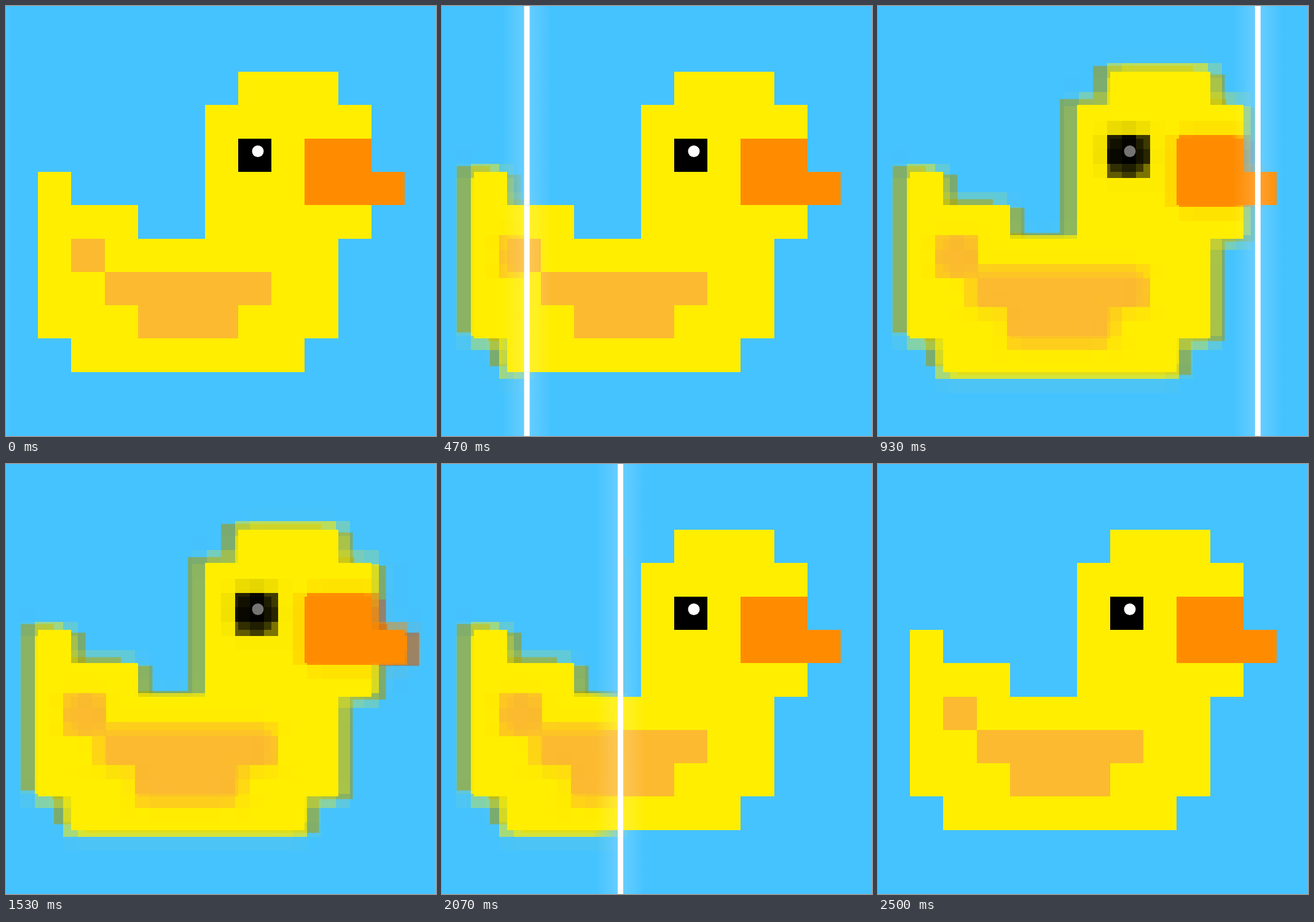
An HTML page with a canvas for the animation above (2630 ms loop, 700 px wide and 700 px high).

```html
<!DOCTYPE html>
<html lang="en">
<head>
<meta charset="utf-8">
<title>Duck sweep</title>
<style>
html, body { margin: 0; width: 100%; height: 100%; overflow: hidden; background: #45c3ff; }
canvas { display: block; width: 100vw; height: 100vh; }
</style>
</head>
<body>
<canvas id="stage" width="700" height="700"></canvas>
<script>
const SIZE = 700, LOOP = 2630, CELLS = 30;
const SKY = '#45c3ff';

// Y body, E eye, B beak, W wing
const DUCK = [
  '      YYY  ',
  '     YYYYY ',
  '     YEYBB ',
  'Y    YYYBBB',
  'YYY  YYYYY ',
  'YWYYYYYYY  ',
  'YYWWWWWYY  ',
  'YYYWWWYYY  ',
  ' YYYYYYY   '
];
const PITCH = 54.3, LEFT = 52, TOP = 107;

const BODY = { Y: '#ffee00', E: '#ffee00', W: '#ffee00', B: '#ff8c00' };
const FULL = { ...BODY, E: '#000', W: '#fcba30' };
const DETAILS = { E: '#000', W: '#fcba30' };
const FEATURES = { ...DETAILS, B: '#ff8c00' };
const GHOST = { Y: '#a39600', E: '#a39600', W: '#a39600', B: '#c64d00' };

const ctx = document.getElementById('stage').getContext('2d');

function layer(size = SIZE) {
  const c = document.createElement('canvas');
  c.width = c.height = size;
  return c.getContext('2d');
}

function duck(colors) {
  const g = layer();
  const edge = (start, i) => Math.round(start + i * PITCH);
  DUCK.forEach((row, j) => [...row].forEach((key, i) => {
    if (!colors[key]) return;
    const x = edge(LEFT, i), y = edge(TOP, j);
    g.fillStyle = colors[key];
    g.fillRect(x, y, edge(LEFT, i + 1) - x, edge(TOP, j + 1) - y);
  }));
  return g.canvas;
}

// Averages a picture over a coarse grid of cells.
function pixelate(picture) {
  const small = layer(CELLS), big = layer();
  small.imageSmoothingQuality = 'high';
  small.filter = 'blur(0.5px)';
  small.drawImage(picture, 0, 0, CELLS, CELLS);
  big.imageSmoothingEnabled = false;
  big.drawImage(small.canvas, 0, 0, SIZE, SIZE);
  return big.canvas;
}

function put(g, picture, alpha = 1, x = 0, y = 0) {
  g.globalAlpha = alpha;
  g.drawImage(picture, x, y);
  g.globalAlpha = 1;
}

function putSoft(g, picture, alpha) {
  g.filter = 'blur(0.7px)';
  put(g, picture, alpha);
  g.filter = 'none';
}

function glint(g, alpha) {
  g.fillStyle = `rgba(255,255,255,${alpha})`;
  g.beginPath();
  g.arc(410, 236.5, 9.5, 0, Math.PI * 2);
  g.fill();
}

function sky() {
  const g = layer();
  g.fillStyle = SKY;
  g.fillRect(0, 0, SIZE, SIZE);
  return g;
}

function cleanScene() {
  const g = sky();
  putSoft(g, duck(FULL));
  glint(g, 1);
  return g.canvas;
}

function mosaicScene() {
  const figure = layer();
  putSoft(figure, duck(BODY));
  figure.globalCompositeOperation = 'source-atop';
  putSoft(figure, duck(DETAILS), 0.5);
  const blocks = pixelate(duck(FEATURES));
  put(figure, blocks);
  put(figure, blocks);
  glint(figure, 0.45);

  const g = sky(), ghost = duck(GHOST);
  put(g, ghost, 0.55, -28, -9.5);
  put(g, ghost, 0.55, 23.5, 4.5);
  put(g, pixelate(duck(BODY)));
  put(g, figure.canvas);
  return g.canvas;
}

const clean = cleanScene(), mosaic = mosaicScene(), masked = layer();

// start, end in ms; from, to in px
const SWEEPS = [
  { start: 136, end: 1216, from: -31, to: 745 },
  { start: 1445, end: 2595, from: 745, to: -55 }
];

function barAt(t) {
  const s = SWEEPS[t < 1330 ? 0 : 1];
  const p = Math.min(1, Math.max(0, (t - s.start) / (s.end - s.start)));
  return s.from + (s.to - s.from) * (1 - Math.cos(Math.PI * p)) / 2;
}

// Thirty steps a second, on a 10 ms clock.
function stepTime(t) {
  const at = k => Math.round(k * 10 / 3) * 10;
  const k = Math.floor(t * 3 / 100) + 1;
  return at(k) <= t ? at(k) : at(k - 1);
}

function fade(g, l, r, stops) {
  const f = g.createLinearGradient(l, 0, r, 0);
  stops.forEach(([p, a]) => f.addColorStop(p, `rgba(255,255,255,${a})`));
  return f;
}

function draw(t) {
  const x = barAt(t);
  masked.globalCompositeOperation = 'copy';
  masked.drawImage(mosaic, 0, 0);
  masked.globalCompositeOperation = 'destination-in';
  masked.fillStyle = fade(masked, x - 45, x + 14, [[0, 1], [1, 0]]);
  masked.fillRect(0, 0, SIZE, SIZE);

  ctx.drawImage(clean, 0, 0);
  ctx.drawImage(masked.canvas, 0, 0);
  ctx.fillStyle = fade(ctx, x - 40, x + 40, [[0, 0], [0.5, 0.2], [1, 0]]);
  ctx.fillRect(x - 40, 0, 80, SIZE);
  ctx.fillStyle = '#fff';
  ctx.fillRect(x - 4.5, 0, 9, SIZE);
}

const begin = performance.now();
function tick() {
  draw(stepTime((performance.now() - begin) % LOOP));
  requestAnimationFrame(tick);
}
tick();
</script>
</body>
</html>
```
